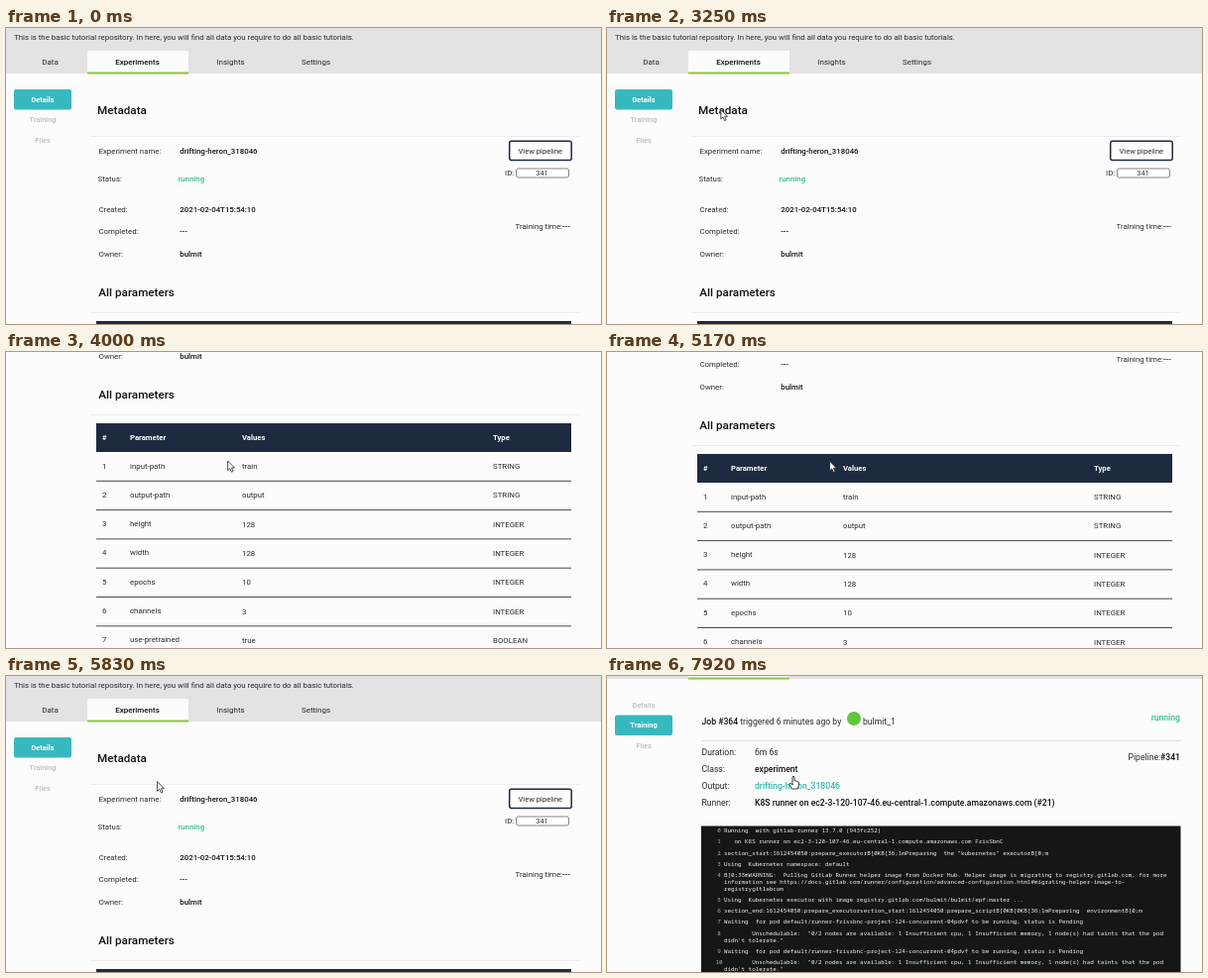
An HTML page for the animation above (8 s loop, 600x299 px).

```html
<!DOCTYPE html>
<html lang="en">
<head>
<meta charset="utf-8">
<title>Experiment details</title>
<style>
  html, body { margin: 0; width: 100%; height: 100%; overflow: hidden; background: #fdfcfd; }
  svg { display: block; width: 100vw; height: 100vh; }
  text { font-family: Roboto, Arial, sans-serif; white-space: pre; fill: #2a2a2a; }
  .strong { font-weight: 500; fill: #111; }
  .go { font-weight: 500; fill: #35bd8c; }
  .link { font-weight: 500; fill: #36b5b0; }
  .head { font-weight: 700; fill: #fff; }
  .side { font-weight: 500; fill: #bdbdbd; }
  .log { font-family: "Noto Sans Mono", "DejaVu Sans Mono", monospace; font-weight: 500; fill: #f4f4f4; }
  .num { font-family: "Noto Sans Mono", "DejaVu Sans Mono", monospace; fill: #b5b5b5; }
</style>
</head>
<body>
<svg viewBox="0 0 600 299" preserveAspectRatio="none">
  <rect width="600" height="299" fill="#fdfcfd"/>
  <g id="page">
    <g id="top"></g>
    <g id="side"></g>
    <g id="details"></g>
    <g id="training"></g>
  </g>
  <g id="cursor" stroke-linejoin="round">
    <path id="arrow" d="M0 0V9.6L2.2 7.6L3.8 11.2L5.4 10.5L3.9 7H6.8Z" fill="#fff" stroke="#222" stroke-width=".8"/>
    <path id="hand" d="M-1 1Q0-.7 1 1V5Q2 4.2 2.8 5.3Q3.7 4.7 4.3 5.8Q5.4 5.4 5.4 7V9.5L4.2 13H-1.6L-4 8.6Q-4.2 7-2.6 7.4L-1 9Z" fill="#fff" stroke="#222" stroke-width=".9"/>
    <path id="beam" d="M-2-4.5H-.5L0-4L.5-4.5H2M0-4V4M-2 4.5H-.5L0 4L.5 4.5H2" fill="none" stroke="#333" stroke-width=".9"/>
  </g>
</svg>
<script>
const $ = id => document.getElementById(id);
const BASE = 7.85, JOB = 8.62, LOG = 5.86;
const FRAME_MS = 1000 / 12, LOOP_MS = 8000;
const EXPERIMENT = 'drifting-heron_318046', OWNER = 'bulmit';

// Text is placed by the vertical middle of its capitals.
const text = (x, mid, content, { size = BASE, cls = '', anchor = 'start' } = {}) =>
  `<text x="${x}" y="${mid + size * 0.355}" font-size="${size}" class="${cls}" text-anchor="${anchor}">${content}</text>`;
const rect = (x, y, w, h, fill, extra = '') =>
  `<rect x="${x}" y="${y}" width="${w}" height="${h}" fill="${fill}" ${extra}/>`;
const rule = (x1, x2, y, color) => rect(x1, y - 0.5, x2 - x1, 1, color);

function topBar() {
  const tabs = [['Data', 44.5], ['Experiments', 132.5], ['Insights', 226.5], ['Settings', 312.5]];
  return rect(0, 0, 600, 46, '#e4e3e4') + rect(82, 23, 102, 23, '#fdfcfd') +
    rect(82, 44.5, 102, 2, '#8cc63f') +
    text(8, 9, 'This is the basic tutorial repository. In here, you will find all data you require to do all basic tutorials.') +
    tabs.map(([name, x], i) => text(x, i === 1 ? 33.8 : 34.3, name,
      { size: 8, anchor: 'middle', cls: i === 1 ? 'strong' : '' })).join('');
}

function sideBar(active) {
  return ['Details', 'Training', 'Files'].map((name, i) => {
    const y = 72.3 + i * 20.4, on = i === active;
    return (on ? rect(8, y - 10.3, 58, 20.5, '#37b8bf', 'rx="2"') : '') +
      text(37, y, name, { size: 7.4, anchor: 'middle', cls: on ? 'head' : 'side' });
  }).join('');
}

function detailsPage() {
  const fields = [
    ['Experiment name:', EXPERIMENT, 124], ['Status:', 'running', 151.8], ['Created:', '2021-02-04T15:54:10', 183],
    ['Completed:', '---', 205.5], ['Owner:', OWNER, 228.3]
  ];
  const params = [
    ['input-path', 'train', 'STRING'], ['output-path', 'output', 'STRING'], ['height', '128', 'INTEGER'],
    ['width', '128', 'INTEGER'], ['epochs', '10', 'INTEGER'], ['channels', '3', 'INTEGER'],
    ['use-pretrained', 'true', 'BOOLEAN'], ['batch-size', '32', 'INTEGER'], ['validation-split', '0.25', 'FLOAT'],
    ['class-mode', 'categorical', 'STRING'], ['learning-rate', '0.0001', 'FLOAT']
  ];
  const columns = [97, 125, 238, 491];
  const heading = { size: 11.7, cls: 'strong' };
  return text(92, 83.3, 'Metadata', heading) + rule(85, 579, 109.5, '#ededed') +
    fields.map(([label, value, y]) => {
      const live = value === 'running';
      return text(live ? 92.5 : 93.5, y, label) + text(live ? 173.5 : 175.3, y, value, { cls: live ? 'go' : 'strong' });
    }).join('') +
    rect(507.7, 114.2, 62.5, 19.4, '#fff', 'rx="2" stroke="#1d2a40" stroke-width="1.5"') +
    text(538.8, 124.2, 'View pipeline', { size: 7.6, anchor: 'middle' }) +
    text(503, 146.3, 'ID:') +
    rect(514.5, 142, 53, 9, '#fff', 'rx="2" stroke="#777" stroke-width=".9"') +
    text(540.5, 146.6, '341', { size: 7.3, anchor: 'middle' }) +
    text(561, 200.5, 'Training time:', { anchor: 'end' }) + text(561, 200.5, '---', { cls: 'strong' }) +
    text(93.3, 267.3, 'All parameters', heading) + rule(85, 579, 287.5, '#ededed') +
    rect(91, 296, 479, 29, '#1d2a40') +
    ['#', 'Parameter', 'Values', 'Type'].map((name, i) => text(columns[i], 310.5, name, { size: 7.7, cls: 'head' })).join('') +
    params.map((row, i) => {
      const y = 338.8 + i * 29.3;
      return [i + 1, ...row].map((cell, c) => text(columns[c], y + (c > 1 ? 0.5 : 0), cell)).join('') +
        rule(91, 570, y + 15.5, '#4a4a4a');
    }).join('');
}

function trainingPage() {
  const strong = { size: JOB, cls: 'strong' }, plain = { size: JOB };
  const fields = [
    ['Duration:', '6m 6s', 120, plain], ['Class:', 'experiment', 137, strong],
    ['Output:', EXPERIMENT, 153.5, { size: JOB, cls: 'link' }],
    ['Runner:', 'K8S runner on ec2-3-120-107-46.eu-central-1.compute.amazonaws.com (#21)', 170.5, strong]
  ];
  const waiting = 'Waiting  for pod default/runner-fzissbnc-project-124-concurrent-04pdvf to be running, status is Pending';
  const unschedulable = '        Unschedulable:  "0/2 nodes are available: 1 Insufficient cpu, 1 Insufficient memory, 1 node(s) had taints that the pod\ndidn\'t tolerate."';
  const log = [
    'Running  with gitlab-runner 13.7.0 (943fc252)',
    '   on K8S runner on ec2-3-120-107-46.eu-central-1.compute.amazonaws.com FzisSbnC',
    'section_start:1612454050:prepare_executorB[0KB[36;1mPreparing  the "kubernetes" executorB[0;m',
    'Using  Kubernetes namespace: default',
    'B[0;33mWARNING:  Pulling GitLab Runner helper image from Docker Hub. Helper image is migrating to registry.gitlab.com, for more\n' +
      'information see https://docs.gitlab.com/runner/configuration/advanced-configuration.html#migrating-helper-image-to-\nregistrygitlabcom',
    `Using  Kubernetes executor with image registry.gitlab.com/${OWNER}/${OWNER}/epf:master ...`,
    'section_end:1612454050:prepare_executorsection_start:1612454050:prepare_scriptB[0KB[0KB[36;1mPreparing  environmentB[0;m',
    waiting, unschedulable, waiting, unschedulable
  ];
  let y = 199.3;
  const lines = log.map((entry, i) => {
    const parts = entry.split('\n');
    const out = text(113, y, i, { size: LOG, cls: 'num', anchor: 'middle' }) +
      parts.map((part, n) => text(118, y + n * 7.2, part, { size: LOG, cls: 'log' })).join('');
    y += 11.1 + (parts.length - 1) * 7.2;
    return out;
  }).join('');
  return text(95.5, 89.3, '<tspan class="strong">Job #364</tspan> triggered 6 minutes ago by', plain) +
    '<circle cx="249" cy="86" r="7" fill="#5fc73c"/>' +
    text(258, 89.3, `${OWNER}_1`, plain) +
    text(578, 85.3, 'running', { size: JOB, cls: 'go', anchor: 'end' }) +
    rule(95, 579, 108.5, '#dedede') +
    fields.map(([label, value, mid, style]) => text(95.5, mid, label, plain) + text(149, mid, value, style)).join('') +
    text(578, 124.5, 'Pipeline:<tspan class="strong">#341</tspan>', { size: JOB, anchor: 'end' }) +
    rect(95, 194.5, 483.5, 200, '#161616') + lines;
}

// Keys: step, value(s); steps run at 12 per second.
const scrollKeys = [[0, 0], [42, 0], [44, 62], [48, 224], [55, 400], [56, 400], [66, 55], [69, 0], [87, 0], [95, 43]];
const cursorKeys = [
  [1, 300, 290, 'arrow'], [10, 70, 84, 'arrow'], [11, 69, 87, 'arrow'], [14, 69, 87, 'arrow'],
  [18, 48, 80, 'hand'], [22, 40, 75, 'hand'], [35, 40, 75, 'hand'], [36, 42, 64, 'hand'], [37, 42, 64, 'arrow'],
  [42, 224, 110, 'arrow'], [43, 224, 110, 'beam'], [45, 223.5, 110, 'arrow'], [56, 224, 110, 'arrow'],
  [66, 225, 110.5, 'arrow'], [75, 62, 102, 'arrow'], [76, 62, 102, 'arrow'], [79, 45, 97, 'hand'],
  [82, 37.5, 94, 'hand'], [87, 37.5, 94, 'hand'], [90, 80, 98, 'arrow'], [94, 184, 101, 'hand'], [95, 188, 101, 'hand']
];
const SWITCH_STEP = 85;

function sample(keys, step) {
  const next = keys.findIndex(key => key[0] > step);
  if (next < 0) return keys[keys.length - 1];
  if (next === 0) return keys[0];
  const a = keys[next - 1], b = keys[next], u = (step - a[0]) / (b[0] - a[0]);
  return a.map((v, i) => typeof v === 'number' ? v + (b[i] - v) * u : v);
}

const show = (id, on) => $(id).setAttribute('visibility', on ? 'inherit' : 'hidden');

$('top').innerHTML = topBar();
$('details').innerHTML = detailsPage();
$('training').innerHTML = trainingPage();
let activeItem = -1;

function draw(ms) {
  const step = Math.floor((ms % LOOP_MS + 4) / FRAME_MS);
  const item = step >= SWITCH_STEP ? 1 : 0;
  if (item !== activeItem) $('side').innerHTML = sideBar(activeItem = item);
  show('details', item === 0);
  show('training', item === 1);
  $('page').setAttribute('transform', `translate(0 ${-sample(scrollKeys, step)[1]})`);
  const [, x, y, shape] = sample(cursorKeys, step);
  $('cursor').setAttribute('transform', `translate(${x} ${y})`);
  show('cursor', step > 0);
  for (const id of ['arrow', 'hand', 'beam']) show(id, id === shape);
}

const start = performance.now();
function tick() {
  draw(performance.now() - start);
  requestAnimationFrame(tick);
}
tick();
</script>
</body>
</html>
```
